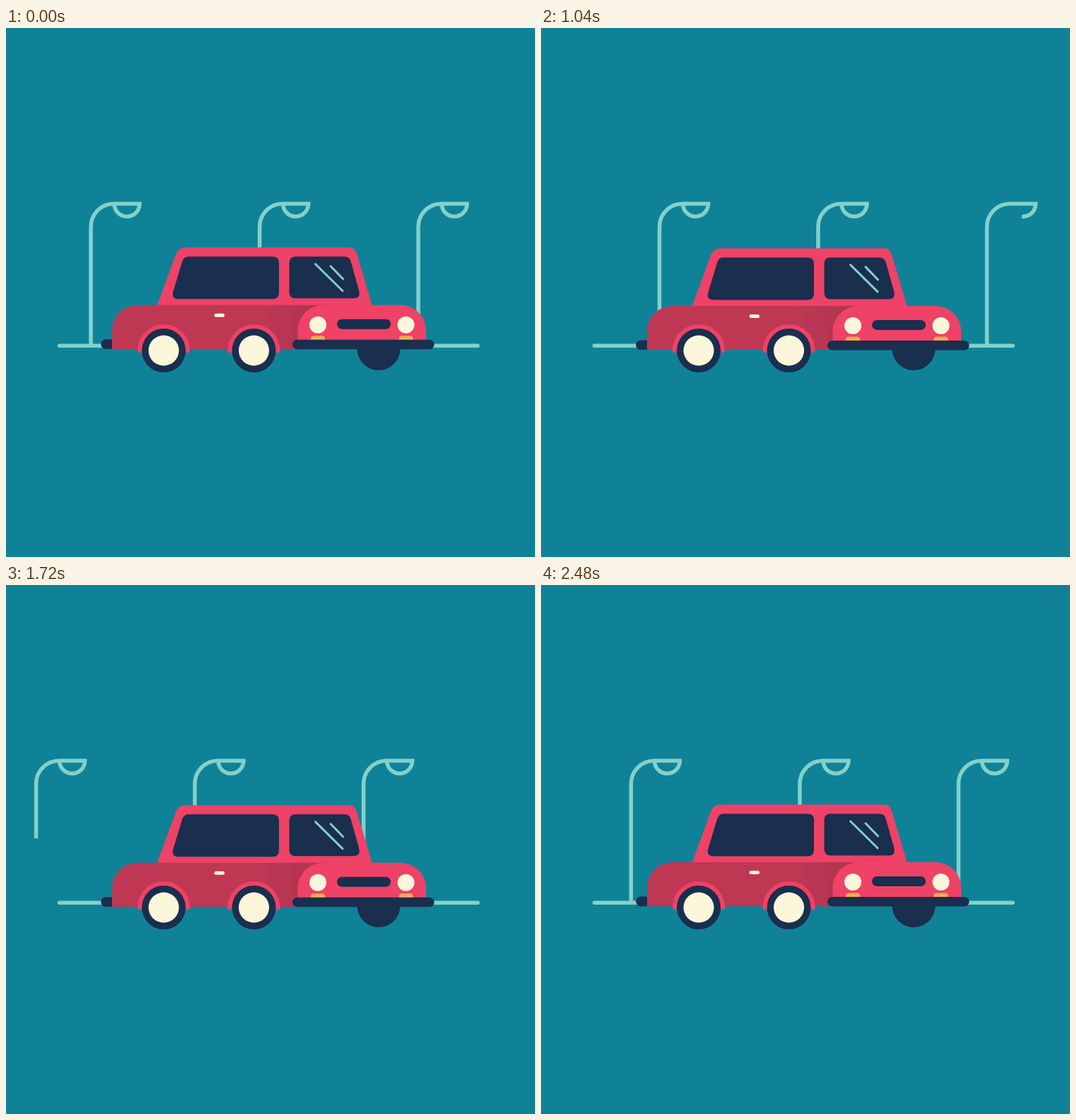
Recreate the animation shown at these times as an HTML page. Size 748 by 748 pixels, loop 2.52 s.

```html
<!DOCTYPE html>
<html lang="en">
<head>
<meta charset="utf-8">
<title>Car and street lamps</title>
<style>
  html, body { margin: 0; height: 100%; overflow: hidden; background: #0f8298; }
  svg { display: block; width: 100%; height: 100%; }
  .navy { fill: #1a2e4e; }
  .pink { fill: #ee4266; }
  .cream { fill: #fcf6da; }
  .amber { fill: #f5aa56; }
  .line { fill: none; stroke: #82d1c9; stroke-width: 5.5; }
  .round { stroke-linecap: round; }
</style>
</head>
<body>
<svg viewBox="0 0 748 748">
  <defs>
    <path id="lamp" d="M0 447V281a32.500 32.500 0 0 1 32.500-32.500H69a18 18 0 0 1-36 0" pathLength="310"/>
    <g id="wheel">
      <path class="pink" d="M-37 456a37 37 0 0 1 74 0v1q0 2-2 2h-70q-2 0-2-2z"/>
      <circle class="navy" cy="456" r="31"/>
      <circle class="cream" cy="456" r="21.500"/>
    </g>
    <g id="light">
      <circle class="cream" cy="420" r="12"/>
      <path class="amber" d="M-10 441.500v-2q0-4 4-4H6q4 0 4 4v2z"/>
    </g>
    <linearGradient id="side" gradientUnits="userSpaceOnUse" x1="350" x2="440">
      <stop stop-color="#be3854"/>
      <stop offset="1" stop-color="#b13550"/>
    </linearGradient>
  </defs>

  <g id="lamps" class="line"></g>
  <path class="line round" d="M75.500 449.300H667"/>

  <circle class="navy" cx="527" cy="453.500" r="30.500"/>
  <g id="body">
    <path class="navy" d="M152 440.500h-11a6.800 6.800 0 0 0 0 13.600h11z"/>
    <path class="pink" d="M213.500 393L240 320.500Q244 310.500 254 310.500H485Q493.500 310.500 496 319.500L517.800 393z"/>
    <path fill="url(#side)" d="M150 454.200V428a36 36 0 0 1 36-36H460V454.200z"/>
    <path class="pink" d="M412.500 443V428a36 36 0 0 1 36-36H558a36 36 0 0 1 36 36V443z"/>
    <path class="navy" d="M258 323.500H377q9 0 9 9V374.500q0 9-9 9H245q-12 0-8.500-11L249 331Q251.500 323.500 258 323.500z"/>
    <path class="navy" d="M409.500 323.500H479Q485.500 323.500 487.500 330L499 371Q502 382.500 491.500 382.500H409.500q-9 0-9-9V332.500q0-9 9-9z"/>
    <path class="line round" style="stroke-width:3" d="M437.500 334L476 372M459 337L476.500 355"/>
    <rect class="cream" x="294.500" y="404" width="14.500" height="5" rx="2.500"/>
    <rect class="navy" x="468" y="412" width="76" height="14" rx="7"/>
    <use href="#light" x="441"/>
    <use href="#light" x="565.500"/>
    <rect class="navy" x="405" y="441" width="200.500" height="13.500" rx="6.750"/>
  </g>
  <use href="#wheel" x="223"/>
  <use href="#wheel" x="350.500"/>
</svg>
<script>
  const LOOP = 2520, FRAME = 40, TRAVEL = 463, LENGTH = 310, TRACE = 460;
  const kinds = [
    { x: 583, draw: -538, erase: 2701 },
    { x: 358.6, draw: -1901, erase: 1588 }
  ];
  const group = document.getElementById('lamps');
  const body = document.getElementById('body');

  // Each lamp outlives one loop, so two overlapping copies are needed.
  const lamps = kinds.flatMap(kind => [-1, 0, 1].map(turn => {
    const el = document.createElementNS('http://www.w3.org/2000/svg', 'use');
    el.setAttribute('href', '#lamp');
    group.append(el);
    return { ...kind, turn, el };
  }));

  const traced = ms => LENGTH * Math.min(1, Math.max(0, ms / TRACE));

  function render(time) {
    for (const { x, draw, erase, turn, el } of lamps) {
      const age = time + turn * LOOP;
      const from = traced(age - erase), to = traced(age - draw);
      el.setAttribute('x', x - TRAVEL * age / LOOP);
      el.style.display = to > from ? '' : 'none';
      el.style.strokeDasharray = `0 ${from} ${to - from} 999`;
    }
    const bob = 0.2 - 0.7 * Math.cos(2 * Math.PI * (4 * time / LOOP - 0.15));
    body.setAttribute('transform', `translate(0 ${bob})`);
  }

  function tick() {
    const now = performance.now() % LOOP;
    render(Math.floor(now / FRAME) * FRAME);
    requestAnimationFrame(tick);
  }
  tick();
</script>
</body>
</html>
```
